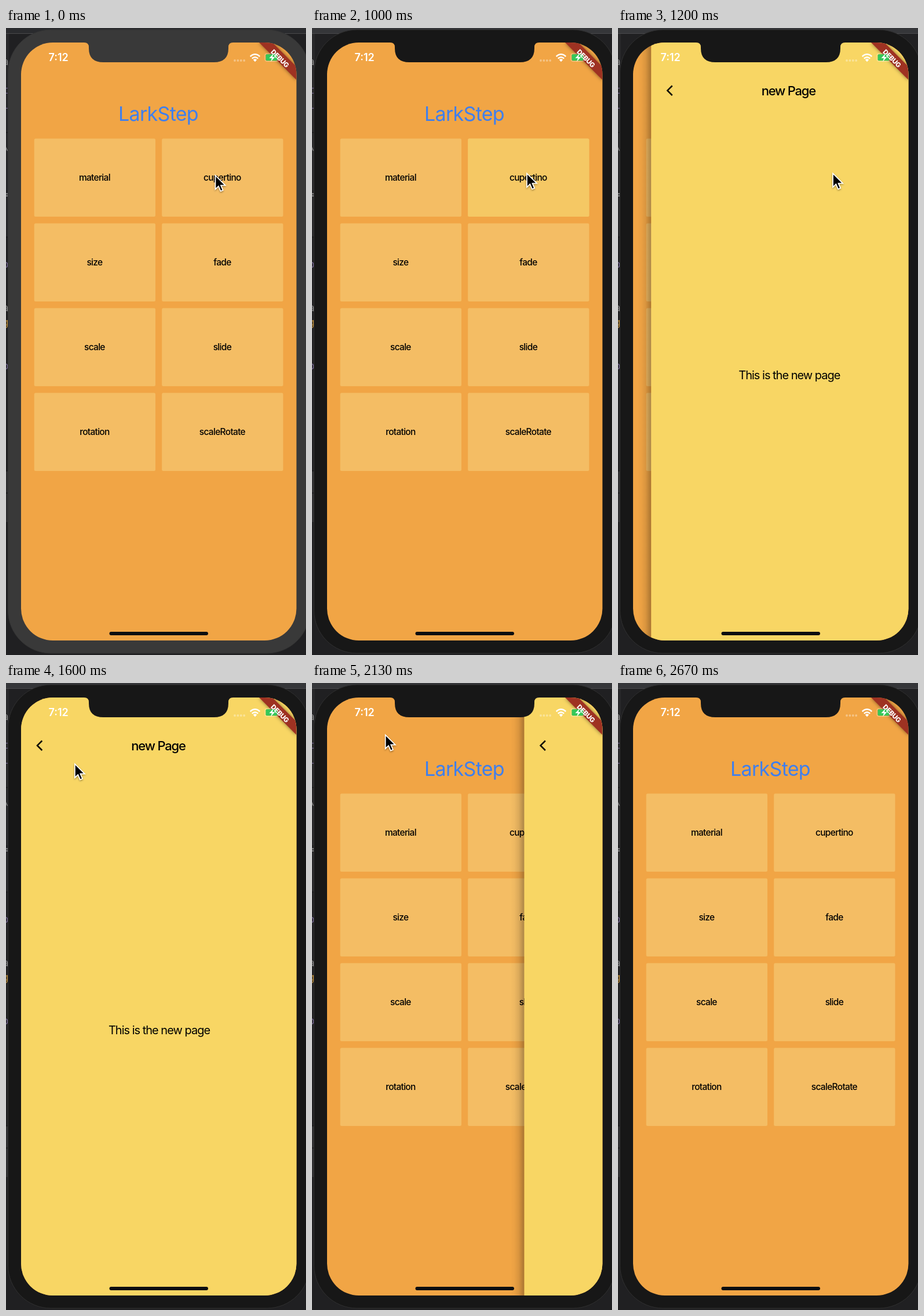
Recreate the animation shown at these times as an HTML page. Size 518 by 1080 pixels, loop 2.74 s.

```html
<!DOCTYPE html>
<html lang="en">
<head>
<meta charset="utf-8">
<title>Route transition</title>
<style>
  html, body { margin: 0; width: 100%; height: 100%; overflow: hidden; background: #202022; }
  svg { display: block; width: 100%; height: 100%; }
  text { font-family: Inter, Roboto, sans-serif; font-optical-sizing: none; }
  .mid { text-anchor: middle; }
  .label { font-size: 15.5px; font-weight: 500; letter-spacing: -.7px; }
  .code { font: 18px "DejaVu Sans Mono", monospace; text-anchor: end; opacity: .8; }
</style>
</head>
<body>
<svg viewBox="0 0 518 1080">
  <defs>
    <clipPath id="screen"><rect x="26" y="25" width="475.5" height="1030" rx="55"/></clipPath>
    <clipPath id="corner"><rect x="400" y="25" width="101.5" height="100"/></clipPath>
    <linearGradient id="edge">
      <stop offset="0" stop-opacity="0"/>
      <stop offset=".3" stop-opacity=".03"/>
      <stop offset=".6" stop-opacity=".1"/>
      <stop offset="1" stop-opacity=".3"/>
    </linearGradient>
    <filter id="soft" x="-30%" y="-30%" width="160%" height="160%">
      <feDropShadow dx="0" dy="1.5" stdDeviation="1.5" flood-opacity=".4"/>
    </filter>
    <filter id="ribbonShadow" x="-30%" y="-30%" width="160%" height="160%">
      <feDropShadow dx="0" dy="0" stdDeviation="3" flood-opacity=".5"/>
    </filter>
  </defs>

  <rect width="518" height="1080" fill="#202022"/>
  <rect id="topBar" width="518" height="9"/>
  <path d="M0 9.5H518" stroke="#4a4a4c"/>
  <g id="editor"></g>

  <rect id="bezel" x="3.5" y="3" width="521" height="1074" rx="74"/>

  <g clip-path="url(#screen)">
    <rect x="26" y="25" width="476" height="1030" fill="#f1a545"/>
    <text class="mid" x="263" y="159.5" font-size="34" letter-spacing="-.7" fill="#3f7fee">LarkStep</text>
    <g id="tiles"></g>
    <g id="page">
      <rect x="2" y="25" width="24" height="1030" fill="url(#edge)"/>
      <rect x="26" y="25" width="476" height="1030" fill="#f8d664"/>
      <path d="M62.300 99.500L54 107.700L62.300 116" fill="none" stroke="#000" stroke-width="2.500"/>
      <text class="mid" x="263" y="116" font-size="22" font-weight="500" letter-spacing="-1.200">new Page</text>
      <text class="mid" x="264.500" y="605" font-size="20" letter-spacing="-1">This is the new page</text>
    </g>
    <g clip-path="url(#corner)">
      <path d="M437 25H460L502 67V90Z" fill="#9e3021" filter="url(#ribbonShadow)"/>
    </g>
    <path id="notch" d="M135 24V25Q143 25 143 33V35Q143 59 168 59H359Q384 59 384 35V33Q384 25 392 25V24Z"/>
    <g fill="#fff">
      <text x="73.500" y="57" font-size="18" font-weight="600">7:12</text>
      <g id="dots" opacity=".35"></g>
      <path d="M430 58.200L426.800 54.700Q430 52 433.200 54.700Z"/>
      <g fill="none" stroke="#fff" stroke-width="2.500">
        <path d="M424.800 52.600Q430 48 435.200 52.600"/>
        <path d="M421.700 49.100Q430 41.500 438.300 49.100"/>
      </g>
      <rect x="447" y="44" width="23" height="13.500" rx="3.500" fill="none" stroke="#fff" stroke-opacity=".4"/>
      <rect x="448.500" y="45.300" width="20" height="11" rx="2" fill="#35c759"/>
      <path d="M461.500 44.500L454.500 52H459L457 58L464.500 50H460Z"/>
      <text class="mid" transform="translate(473 52.500) rotate(45)" y="4" font-size="11.500" font-weight="800" letter-spacing="-.3">DEBUG</text>
    </g>
    <rect x="178.500" y="1040" width="170.500" height="6" rx="3" fill="#0c0e10"/>
  </g>

  <g id="cursor" filter="url(#soft)">
    <path d="M1.500 2V25.500L6.900 20.500L10.600 29L14.600 27.300L11 19H18.500Z"
      fill="#000" stroke="#fff" stroke-width="1.700"/>
  </g>
</svg>
<script>
const LOOP = 2740, STEP = 200 / 3, WIDTH = 475.5;
const el = id => document.getElementById(id);
const clamp = x => Math.min(1, Math.max(0, x));
const span = (t, start, length) => clamp((t - start) / length);
const smooth = p => p * p * (3 - 2 * p);
const mix = (a, b, p) => a + (b - a) * p;

// Fast start, long settle: cubic-bezier(.35, .91, .33, .97)
function settle(x) {
  if (x <= 0 || x >= 1) return clamp(x);
  const bezier = (s, a, b) => 3 * (1 - s) ** 2 * s * a + 3 * (1 - s) * s * s * b + s ** 3;
  let low = 0, high = 1;
  for (let i = 0; i < 24; i++) {
    const s = (low + high) / 2;
    if (bezier(s, .35, .33) < x) low = s; else high = s;
  }
  return bezier(low, .91, .97);
}

const labels = ["material", "cupertino", "size", "fade", "scale", "slide", "rotation", "scaleRotate"];
el("tiles").innerHTML = labels.map((label, i) => {
  const x = 48.7 + i % 2 * 220.5, y = 190.5 + Math.floor(i / 2) * 146;
  return `<rect x="${x}" y="${y}" width="209.3" height="134.5" rx="2.5" fill="#f4bd64"/>` +
    (i === 1 ? `<rect id="ink" x="${x}" y="${y}" width="209.3" height="134.5" rx="2.5" fill="#f5c864"/>` : "") +
    `<text class="mid label" x="${x + 104.2}" y="${y + 72.5}">${label}</text>`;
}).join("");

el("dots").innerHTML = [0, 1, 2, 3].map(i =>
  `<circle cx="${395 + i * 5.4}" cy="56" r="1.9"/>`).join("");

const scraps = [["a", 64, "#999"], ["t", 113, "#8574a8"], ["l", 139, "#8574a8"], ["\\", 210, "#999"],
  ["=", 293, "#bbb"], ["o", 413, "#8574a8"], ["a", 488, "#999"], ["g", 513, "#d9a03c"], ["o", 588, "#8574a8"]];
el("editor").innerHTML =
  `<rect y="10" width="5" height="350" fill="#28282a"/><rect y="763" width="4" height="88" fill="#303032"/>` +
  [180, 281, 360, 763, 801].map(y => `<path d="M0 ${y}H5" stroke="#101012"/>`).join("") +
  scraps.map(([glyph, y, color]) => `<text class="code" x="4.5" y="${y}" fill="${color}">${glyph}</text>`).join("");

function pointer(t) {
  if (t < 1300) {
    const p = t < 470 ? t / 470 * .7 : mix(.7, 1, span(t, 470, 400));
    return [mix(360, 369.5, p), mix(252, 248.5, smooth(clamp(p / .7)))];
  }
  if (t < 2030) {
    const p = smooth(span(t, 1300, 420));
    return [mix(369.5, 55, p), mix(248.5, 110, p)];
  }
  const p = (t - 2030) / 103;
  return [mix(55, 125, p), mix(110, 87.5, p)];
}

function draw(t) {
  const focused = t >= 790;
  const shell = focused ? "#171717" : "#393939";
  el("bezel").setAttribute("fill", shell);
  el("bezel").setAttribute("stroke", focused ? "#303030" : "#333");
  el("notch").setAttribute("fill", shell);
  el("topBar").setAttribute("fill", focused ? "#353639" : "#2a2b2e");

  const pressed = t < 1300 ? smooth(span(t, 780, 180)) : 0;
  el("ink").setAttribute("opacity", pressed);

  const offset = WIDTH * (t < 2029 ? 1 - settle(span(t, 1014, 350)) : settle(span(t, 2029, 350)));
  el("page").setAttribute("transform", `translate(${offset.toFixed(2)})`);
  el("page").setAttribute("visibility", offset < WIDTH ? "visible" : "hidden");

  const [x, y] = pointer(t);
  el("cursor").setAttribute("transform", `translate(${x.toFixed(2)} ${y.toFixed(2)})`);
  el("cursor").setAttribute("visibility", t < 2260 ? "visible" : "hidden");
}

function tick() {
  const t = performance.now() % LOOP;
  draw(Math.floor((t + 3.34) / STEP) * STEP);
  requestAnimationFrame(tick);
}
tick();
</script>
</body>
</html>
```
